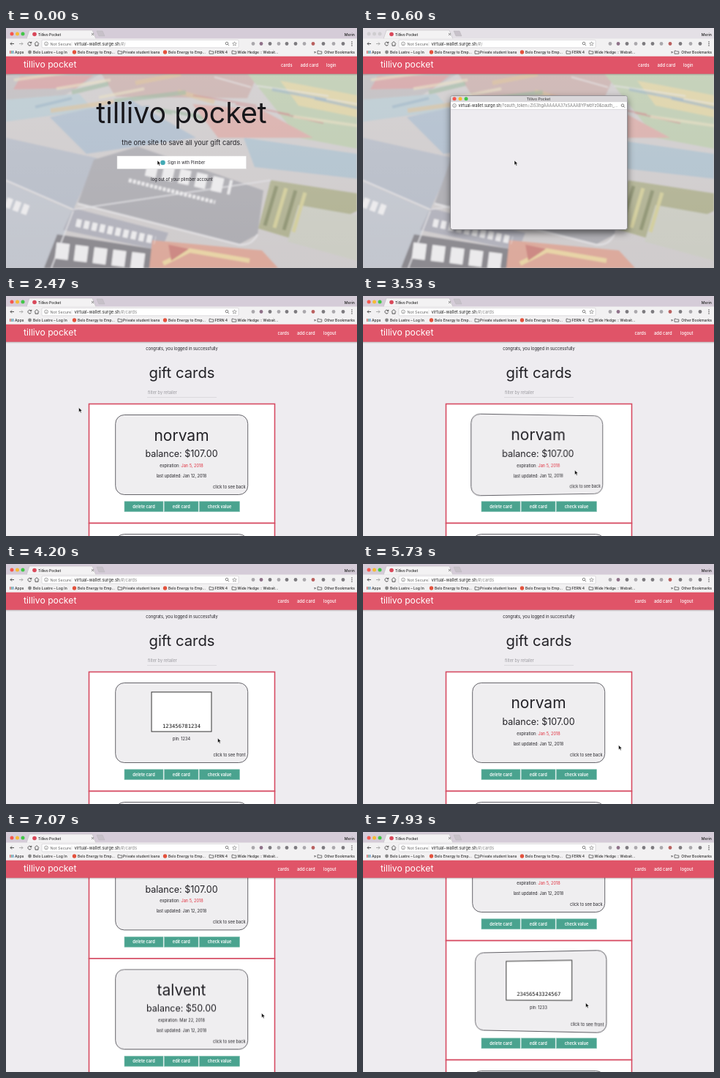
An HTML page that plays this animation: 480 by 328 pixels, repeating every 8000 ms.

```html
<!DOCTYPE html>
<html lang="en">
<head>
<meta charset="utf-8">
<style>
  html, body { margin: 0; width: 100%; height: 100%; overflow: hidden; background: #eeecf0; }
  #stage { position: relative; width: 480px; height: 328px; overflow: hidden; background: #eeecf0; }
  #stage > *, .face { position: absolute; left: 0; top: 0; }
  svg { display: block; overflow: visible; font-family: Inter, "Open Sans", sans-serif; }
  #list { width: 480px; height: 328px; }
  .card { position: absolute; left: 149px; width: 182px; height: 110px; }
  #popup { transform-origin: 240px 184px; }
</style>
</head>
<body>
<div id="stage"></div>
<script>
const LOOP = 8000;
const INK = '#222126', RED = '#e05468', EDGE = '#d64b62', TEAL = '#4aa38f', PAGE = '#eeecf0';
const BRAND = 'tillivo pocket', TITLE = 'Tillivo Pocket', SITE = 'virtual-wallet.surge.sh';

// SVG helpers
const text = (x, y, size, str, fill = INK, anchor = 'middle', extra = '') =>
  `<text x="${x}" y="${y}" font-size="${size}" fill="${fill}" text-anchor="${anchor}" ${extra}>${str}</text>`;
const rect = (x, y, w, h, fill, extra = '') =>
  `<rect x="${x}" y="${y}" width="${w}" height="${h}" fill="${fill}" ${extra}/>`;
const dot = (x, y, r, fill, extra = '') => `<circle cx="${x}" cy="${y}" r="${r}" fill="${fill}" ${extra}/>`;
const line = (d, stroke, width = 0.8, extra = '') =>
  `<path d="${d}" fill="none" stroke="${stroke}" stroke-width="${width}" ${extra}/>`;
const svg = (body, id = '', w = 480, h = 328, cls = '') =>
  `<svg id="${id}" class="${cls}" width="${w}" height="${h}" viewBox="0 0 ${w} ${h}">${body}</svg>`;
const lens = (x, y) => dot(x, y, 1.8, 'none', 'stroke="#666" stroke-width=".8"') +
  line(`M${x + 1.3} ${y + 1.3}l1.8 1.8`, '#666');
const info = (x, y) => dot(x, y, 2.4, 'none', 'stroke="#777" stroke-width=".7"') +
  line(`M${x} ${y - 0.4}v1.7`, '#777', 0.7);
const lights = (x, y, step) => ['#f5574f', '#f6bb35', '#42c648']
  .map((c, i) => dot(x + i * step, y, 2.5, c)).join('');

// Landing page: pale, blurred pile of plastic cards
function photo() {
  const shapes = [
    ['#b9b5b8', '0,62 130,62 60,104 0,108'],
    ['#cf9a9c', '20,66 120,64 96,82 10,84'],
    ['#b3c4cc', '0,98 100,90 120,112 0,128'],
    ['#c4a9a6', '130,62 345,62 330,96 150,94'],
    ['#b7c6a9', '330,62 480,62 480,165 400,150'],
    ['#d9cd9d', '375,72 480,92 480,122 400,106'],
    ['#a8b7c8', '60,122 170,98 260,150 110,172'],
    ['#d5a6a2', '255,104 350,112 420,150 290,150'],
    ['#a9bcc9', '325,150 480,172 480,206 340,190'],
    ['#b0b6c2', '0,150 125,178 92,248 0,208'],
    ['#a5a4aa', '120,180 180,162 352,222 344,282 318,296 98,240'],
    ['#bcc0c9', '0,210 92,250 62,328 0,328'],
    ['#a9a9b4', '92,246 222,280 212,304 78,276'],
    ['#7f7d83', '70,282 215,304 205,328 52,328'],
    ['#d8a091', '200,290 350,304 372,328 196,328'],
    ['#a9aa88', '362,208 480,226 480,250 398,290 345,274'],
    ['#c6c7bd', '400,242 480,256 480,318 385,292']
  ];
  const tints = ['#c77f80', '#e3d9b8', '#8fae93', '#e2e0e2', '#8fa9bd', '#d8b98a'];
  // Edges of stacked cards, fanned along the top
  const edges = Array.from({ length: 24 }, (_, i) => {
    const x = (i * 137) % 440 - 10, y = 66 + (i * 29) % 62;
    return line(`M${x} ${y}l${50 + i % 5 * 12} ${x < 200 ? -12 : 14}`, tints[i % 6], 2 + i % 3 * 2, 'opacity=".65"');
  }).join('');
  const spines = [0, 1, 2, 3].map(i =>
    line(`M${370 + i * 13} ${216 + i * 3}l-16 54`, i % 2 ? '#cdc892' : '#858a66', 5)).join('');
  // Pale dashes stand for embossed lettering
  const lettering = (d, width, dash) => line(d, '#e9e8ea', width, `stroke-dasharray="${dash}"`);
  return `<defs><filter id="soft"><feGaussianBlur stdDeviation="1.3"/></filter>
    <linearGradient id="haze" x2="0" y2="1"><stop stop-color="#fff" stop-opacity=".22"/>
    <stop offset="1" stop-color="#fff" stop-opacity=".1"/></linearGradient></defs>` +
    rect(0, 62, 480, 266, '#cac6c7') +
    `<g filter="url(#soft)">
      ${shapes.map(([c, p], i) => (i === 6 ? edges : '') + `<polygon points="${p}" fill="${c}"/>`).join('')}
      ${spines}
      ${line('M98 240l220 56q18 2 26-14', '#dddbde', 2.5)}
      ${line('M0 208l92 40 270-40M62 328l30-78', '#dddce0', 1.6)}
      ${lettering('M192 192l116 26', 20, '15 8')}
      ${lettering('M168 208l118 30', 5, '4 2')}
      ${lettering('M96 266l108 24', 11, '7 4')}
      ${lettering('M68 304l128 16', 22, '18 8')}
      ${lettering('M0 238l32 12', 14, '8 4')}
      ${line('M215 322l36-18 82 14', '#e5cf9c', 6)}
      <polygon points="222,296 250,302 226,318" fill="#c77b76"/></g>` +
    rect(0, 62, 480, 266, 'url(#haze)');
}

const home = photo() +
  text(240, 130, 39.3, BRAND, '#17161a') +
  text(240.5, 160, 9.2, 'the one site to save all your gift cards.') +
  rect(152, 175, 176.5, 17.5, '#fff', 'stroke="#ddd" stroke-width=".5"') +
  dot(214.5, 184, 3.3, '#43aab5') +
  text(221, 185.7, 5.5, 'Sign in with Plimber', INK, 'start') +
  text(240.5, 208.5, 5.7, 'log out of your plimber account');

// Gift card list
const PITCH = 163;
const cards = [
  { name: 'norvam', balance: '107.00', expires: 'Jan 5, 2018', tint: '#e0303f', code: '123456781234', pin: 1234 },
  { name: 'talvent', balance: '50.00', expires: 'Mar 22, 2018', tint: INK, code: '23456543324567', pin: 1233 },
  { name: '', balance: '', expires: '', tint: INK, code: '', pin: '' }
];
const button = (x, y, w, label) => rect(x, y, w, 14, TEAL, 'stroke="#83c0b2" stroke-width=".6"') +
  text(x + w / 2, y + 9, 5.6, label, '#fff', 'middle', 'font-weight="600"');
const panel = (_, i) => {
  const y = 147.5 + i * PITCH;
  return rect(113.5, y, 254, PITCH, '#fff', `stroke="${EDGE}" stroke-width="1.6"`) +
    button(162, y + 133.3, 53, 'delete card') + button(216.5, y + 133.3, 46.5, 'edit card') +
    button(264.5, y + 133.3, 55, 'check value');
};
const face = (body, hiddenSide) => svg(
  rect(0.7, 0.5, 181, 109, '#efeef0', 'rx="12" stroke="#65646a" stroke-width="1"') + body +
  text(178.5, 101, 5.6, 'click to see ' + hiddenSide, INK, 'end'), '', 182, 110, 'face');
const front = c => face(
  text(91, 35.5, 21, c.name) +
  text(91, 58.3, 12.5, 'balance: $' + c.balance) +
  text(91, 72, 5.6, `expiration: <tspan fill="${c.tint}">${c.expires}</tspan>`) +
  text(91, 86, 5.6, 'last updated: Jan 12, 2018'), 'back');
const back = c => {
  const w = 30 + c.code.length * 4.33;
  return face(rect(91 - w / 2, 13, w, 54, '#fff', 'stroke="#333" stroke-width="1"') +
    text(91, 61.5, 7.2, c.code, '#111', 'middle', 'font-family="DejaVu Sans Mono, monospace"') +
    text(91, 79, 5.6, 'pin: ' + c.pin), 'front');
};
const cardHtml = (c, i) =>
  `<div class="card" style="top:${161.5 + i * PITCH}px">${front(c)}${back(c)}</div>`;
const list = svg(
  text(240.5, 73.7, 5.7, 'congrats, you logged in successfully') +
  text(240.5, 112.3, 20.3, 'gift cards') +
  text(194, 134.2, 5.6, 'filter by retailer', '#9b9a9f', 'start') +
  line('M193 138.5h95', '#cfcdd2', 0.6) + cards.map(panel).join('')) + cards.map(cardHtml).join('');

// Browser frame and site header
const folder = x => line(`M${x} 31.2h2l.8 .8h3v3.2h-5.8z`, '#666', 0.9);
const mark = (x, label, anchor = 'start') => text(x, 35, 5, label, '#2b2b2b', anchor, 'font-weight="500"');
const browser =
  `<g id="bar">${rect(0, 0, 480, 15, '#d5ccd8')}</g>` +
  `<path d="M28 15l4-12h86l5 12z" fill="#f3f2f3" stroke="#b9b7ba" stroke-width=".5"/>` +
  `<path d="M124 4h8l3 7h-8z" fill="#c7c1c9" stroke="#b3b1b4" stroke-width=".4"/>` +
  `<g id="lights">${lights(8, 8, 7.5)}</g>` +
  `<g id="dull">${[8, 15.5, 23].map(x => dot(x, 8, 2.5, '#cfcdd0')).join('')}</g>` +
  dot(39, 8.5, 2.8, '#d9485a') + text(44, 10.5, 4.9, TITLE, '#222', 'start', 'font-weight="500"') +
  line('M117 7l3 3m0-3l-3 3', '#666') + text(477, 10.5, 5.2, 'Merin', '#222', 'end', 'font-weight="500"') +
  rect(0, 14.5, 480, 24.5, '#f2f1f2') +
  line('M11 21.5h-5m2-2l-2 2l2 2', '#555', 1) + line('M18 21.5h5m-2-2l2 2l-2 2', '#aaa', 1) +
  line('M34.5 20.5a2.4 2.4 0 1 0 .1 2m.2-3.8v2h-2', '#555', 1) +
  line('M39 21.5l3-3l3 3m-5 0v2.7h4v-2.7', '#555', 1) +
  rect(49, 16.3, 269, 10.6, '#fff', 'rx="1.5" stroke="#c8c6c9" stroke-width=".6"') +
  info(55, 21.5) + text(60.5, 23.5, 5.4, 'Not Secure', '#666', 'start') + line('M90 18.5v6.5', '#ccc', 0.5) +
  text(93.5, 23.6, 5.9, `${SITE}<tspan id="route" fill="#888"></tspan>`, '#222', 'start') +
  lens(302, 21) + line('M312.5 18.8l.8 1.8l2 .2l-1.5 1.3l.5 2l-1.8-1l-1.8 1l.5-2l-1.5-1.3l2-.2z', '#777', 0.6) +
  [338, 349, 361, 373, 384, 396, 408, 420, 434, 448, 461].map((x, i) =>
    dot(x, 21.5, 2.4, i === 1 ? '#8f7189' : i === 7 ? '#b9605f' : i % 3 ? '#7d7b7f' : '#aaa8ac')).join('') +
  [19, 21.5, 24].map(y => dot(473, y, 0.8, '#555')).join('') +
  [0, 1, 2].map(i => rect(5 + i * 2, 31, 1.4, 4, ['#d66', '#6a9', '#69c'][i])).join('') + mark(12, 'Apps') +
  dot(32.5, 33, 2.4, '#888') + mark(37, 'Belo Lustre – Log In') +
  dot(93.5, 33, 2.7, '#e3523d') + mark(98, 'Belo Energy to Emp...') +
  folder(153) + mark(160, 'Private student loans') +
  dot(217.5, 33, 2.7, '#e3523d') + mark(222, 'Belo Energy to Emp...') +
  folder(278) + mark(285.5, 'FERN 4') +
  folder(309) + mark(316.5, 'Wide Hedge :: Websit...') +
  mark(421, '»') + folder(426) + mark(477, 'Other Bookmarks', 'end') +
  [0.05, 0.08, 0.12].map((o, i) => rect(0, 62, 480, 3 - i, '#000', `opacity="${o}"`)).join('') +
  rect(0, 38.7, 480, 24, RED) + text(24, 54, 12.2, BRAND, '#fff', 'start') +
  ['login', 'logout'].map((label, i) => {
    const shift = i * 4.5;
    const link = (x, str) => text(x, 52.5, 5.8, str, '#fff', 'end', 'font-weight="500"');
    return `<g id="${label}">` + link(391.5 - shift, 'cards') + link(427 - shift, 'add card') +
      link(451.5, label) + '</g>';
  }).join('');

const popup =
  rect(119.5, 92.5, 242, 183, PAGE, 'rx="3" stroke="#85838a" stroke-width=".8" style="filter:drop-shadow(0 4px 5px #0008)"') +
  `<path d="M120 101.5v-6q0-2.6 3-2.6h235.5q2.8 0 2.8 2.6v6z" fill="#d9d7da"/>` +
  lights(125, 96.7, 8) + text(240, 98.7, 5.2, TITLE, '#333') +
  rect(120, 101.2, 241, 10, '#fff') + line('M120 111.4h241', '#c5c3c7', 0.5) + info(125, 106) +
  text(130.5, 108, 5.5, SITE + '<tspan fill="#777">/?oauth_token=ZiS3hgAAAAAA37xSAAABYPwbYz0&amp;oauth_...</tspan>', '#222', 'start') +
  lens(355, 105.7) +
  `<g id="waiting">${rect(119.7, 267.5, 80, 7.5, '#f5f4f5', 'stroke="#999" stroke-width=".6"')}
  ${text(121.5, 273, 4.8, `Waiting for ${SITE}...`, '#222', 'start', 'font-weight="500"')}</g>`;

const arrow = '<path d="M0 0v6.2l1.5-1.3l1 2.3l1.2-.5l-1-2.2h2z" fill="#111" stroke="#fff" stroke-width=".5"/>';

const stage = document.getElementById('stage');
stage.innerHTML = svg(home, 'home') + `<div id="list">${list}</div>` + svg(browser, 'browser') +
  svg(popup, 'popup') + svg(arrow, 'cursor', 8, 10);
const $ = id => document.getElementById(id);
const faces = [...stage.querySelectorAll('.card')].map(c => [...c.querySelectorAll('.face')]);

// Timing
const clamp = v => Math.max(0, Math.min(1, v));
const progress = (t, start, length) => clamp((t - start) / length);
const smooth = u => u * u * (3 - 2 * u);
// CSS "ease": cubic-bezier(.25, .1, .25, 1)
function ease(x) {
  let lo = 0, hi = 1, u = x;
  for (let i = 0; i < 18; i++) {
    u = (lo + hi) / 2;
    if (0.75 * u * (1 - u) + u ** 3 < x) lo = u; else hi = u;
  }
  return 0.3 * u * (1 - u) ** 2 + 3 * u * u * (1 - u) + u ** 3;
}
function track(keys, t, curve = smooth) {
  const i = keys.findIndex(k => k[0] > t);
  if (i === 0) return keys[0].slice(1);
  if (i < 0) return keys[keys.length - 1].slice(1);
  const [t0, ...a] = keys[i - 1], [t1, ...b] = keys[i];
  const u = curve((t - t0) / (t1 - t0));
  return a.map((v, k) => v + (b[k] - v) * u);
}
const cursorPath = [
  [870, 207, 181], [1400, 88.5, 148.5], [1900, 88.5, 148.5], [2130, 99.5, 152.5], [2470, 99.5, 152.5],
  [3070, 289.5, 238], [4950, 289.5, 238], [5330, 349.5, 247.5], [7150, 349.5, 247.5], [7430, 304.5, 233.5]
];
const scrollPath = [
  [5730, 0], [5800, 3], [5950, 3], [6150, 25], [6400, 68], [6600, 81],
  [6800, 92], [7000, 128], [7200, 155], [7380, 162]
];
const flip = (t, start) => 180 * ease(progress(t, start, 600));

function show(el, on) { el.style.display = on ? '' : 'none'; }

function draw(t) {
  const loggedIn = t >= 1930, popped = t >= 330 && t < 1760;
  show($('home'), !loggedIn);
  show($('list'), loggedIn);
  show($('login'), !loggedIn);
  show($('logout'), loggedIn);
  show($('popup'), popped);
  show($('waiting'), t >= 930);
  show($('lights'), !popped);
  show($('dull'), popped);
  $('bar').style.opacity = popped ? 0.4 : 1;
  $('route').textContent = loggedIn ? '/#/cards' : '/#/';

  const open = smooth(progress(t, 330, 200));
  $('popup').style.transform = `scale(${0.85 + 0.15 * open})`;
  $('popup').style.opacity = open;

  $('list').style.transform = `translateY(${-track(scrollPath, t, u => u)[0]}px)`;
  [flip(t, 3500) - flip(t, 4630), flip(t, 7490), 0].forEach((angle, i) => {
    faces[i].forEach((el, side) => {
      show(el, (angle > 90) === (side === 1));
      const turn = angle - side * 180;
      el.style.transform = turn ? `perspective(375px) rotateY(${turn}deg)` : 'none';
    });
  });

  const [x, y] = track(cursorPath, t);
  $('cursor').style.transform = `translate(${x}px, ${y}px)`;
}

function tick() {
  draw(performance.now() % LOOP);
  requestAnimationFrame(tick);
}
tick();
</script>
</body>
</html>
```
